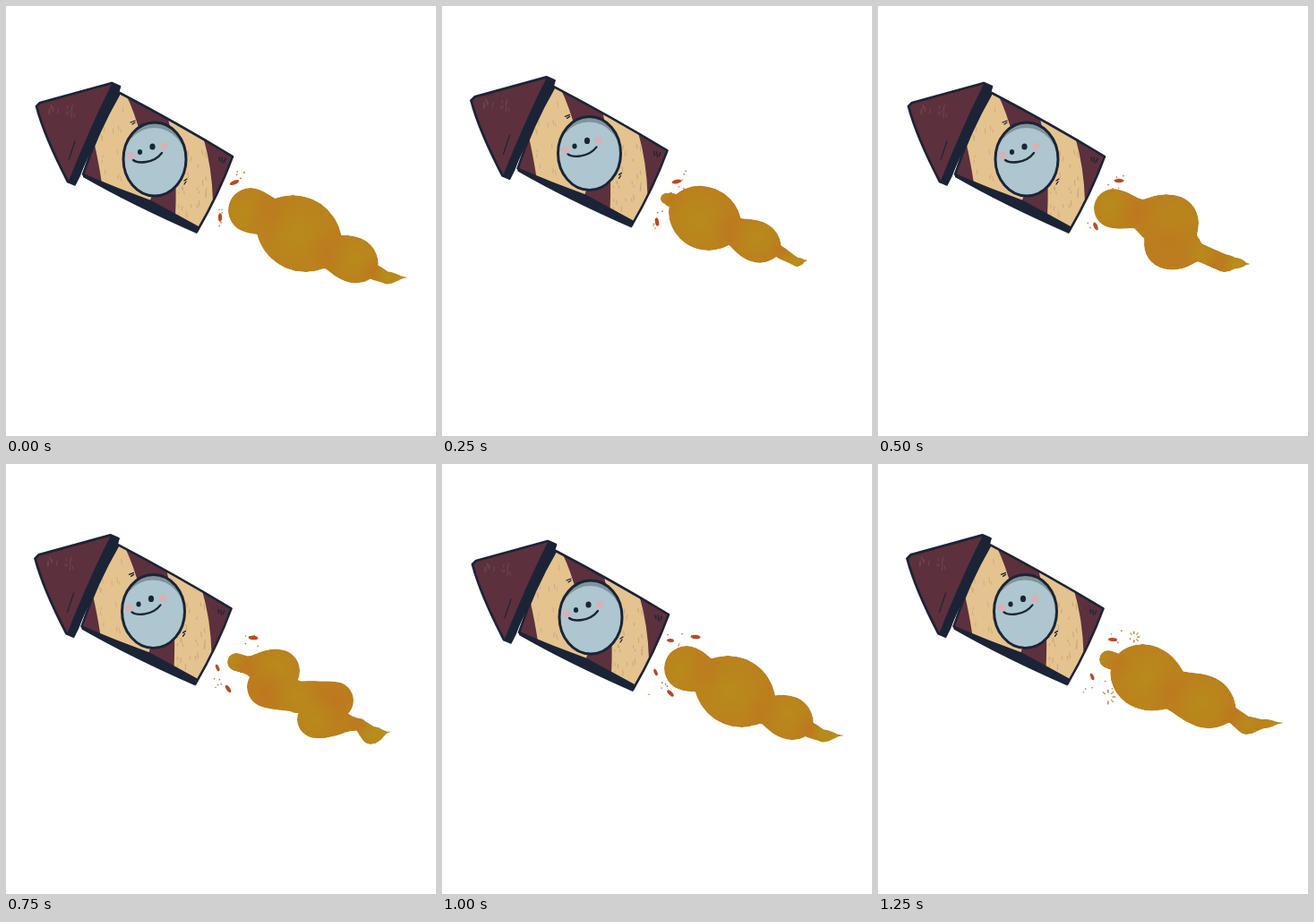
An HTML page with a canvas for the animation above (1500 ms loop, 480 by 480 pixels).

```html
<!DOCTYPE html>
<html lang="en">
<head>
<meta charset="utf-8">
<title>Rocket</title>
<style>
html, body { margin: 0; width: 100%; height: 100%; overflow: hidden; background: #fff; }
canvas { display: block; width: 480px; height: 480px; }
</style>
</head>
<body>
<canvas id="stage" width="480" height="480"></canvas>
<script>
const ctx = document.getElementById('stage').getContext('2d');
const INK = '#1b2437', MAROON = '#5d303d', CREAM = '#e4c38e', GLASS = '#adc6cf';
const FLAME = '#bb7f1e', ORANGE = '#c0711f', MUSTARD = '#b5941a', EMBER = '#b94a22';
const STEP = 250;

function random(seed) {
  return () => (seed = seed * 16807 % 2147483647) / 2147483647;
}

function fill(path, color) { ctx.fillStyle = color; ctx.fill(path); }

function stroke(path, color, width) {
  ctx.strokeStyle = color;
  ctx.lineWidth = width;
  ctx.stroke(path);
}

function oval(x, y, rx, ry, turn = 0) {
  const path = new Path2D();
  path.ellipse(x, y, rx, ry, turn, 0, 7);
  return path;
}

function grain(seed, count, x, y, w, h, color) {
  const rnd = random(seed), path = new Path2D();
  for (let i = 0; i < count; i++) {
    const u = x + rnd() * w, v = y + rnd() * h;
    path.moveTo(u, v);
    path.lineTo(u - 1 + rnd() * 2, v + 2 + rnd() * 4);
  }
  stroke(path, color, 1);
}

const nose = new Path2D('M34 112L38 108L118 86L127 90L77 197L69 196Q43 146 34 112Z');
const band = new Path2D('M119 87L127 90L126 96Q98 148 82 190L77 200L70 197Q96 132 119 87Z');
const body = new Path2D('M127 97Q190 130 253 168Q238 209 213 252L86 188Q102 140 127 97Z');
const keel = new Path2D('M86 187L125 203L162 217L215 246L213 254Q140 222 86 191Z');
const stripes = [
  new Path2D('M98 151Q103 172 107 198L84 188Z'),
  new Path2D('M134 99L181 126Q192 170 189 236L159 222L163 211Q154 140 134 99Z'),
  new Path2D('M220 146L255 166L231 218Q230 180 220 146Z')
];
const ticks = new Path2D('M139 130l5-2M141 132l3-2M199 195l3-2M199 199l2-3M238 169l1 4M241 169l1 6M245 170l-1 4');
const noseLine = new Path2D('M70 172L77 151');
const smile = new Path2D('M142 172C147 176 165 176 174 164');

function drawBody() {
  ctx.save();
  ctx.clip(body);
  fill(body, CREAM);
  grain(41, 16, 106, 112, 26, 80, '#d2ac79');
  grain(77, 28, 192, 160, 32, 72, '#cba579');
  stripes.forEach(s => fill(s, MAROON));
  ctx.restore();
  fill(keel, INK);
  stroke(body, INK, 2.6);
  stroke(ticks, INK, 1.3);
}

function drawFace() {
  const disc = oval(166, 171, 35, 41);
  ctx.save();
  ctx.clip(disc);
  fill(disc, '#7d959d');
  fill(oval(165.5, 178, 37, 42), GLASS);
  ctx.restore();
  stroke(disc, INK, 3);
  fill(oval(139, 167, 4.5, 4), '#d9b0b5');
  fill(oval(176.5, 156.5, 4.5, 4), '#d9b0b5');
  fill(oval(149.5, 163, 2.6, 3), INK);
  fill(oval(163.5, 157, 3.1, 3.6), INK);
  stroke(smile, INK, 2.3);
}

function drawNose() {
  fill(nose, MAROON);
  grain(19, 13, 48, 110, 28, 12, '#704650');
  stroke(nose, INK, 2.8);
  fill(band, INK);
  stroke(band, INK, 1.5);
  stroke(noseLine, INK, 1.2);
}

function drawRocket(lifted) {
  ctx.save();
  if (lifted) ctx.translate(-1.5, -6.6);
  drawBody();
  drawFace();
  drawNose();
  ctx.restore();
}

// A flame is a circle swept along a chain of bulbs and necks: [x, y, radius].
const plume = (neck, bulb, waist, knob) => [
  [273, 228, 25], [293, 235.5, neck], [327, 254, bulb], [363, 274.5, waist],
  [387, 283, knob], [409, 296, 9], [425, 303.5, 7], [447, 303, 0.5]
];
const flames = [
  plume(22, 41, 20, 25.5),
  [[250, 215, 6], [257, 217, 8], [293, 237, 35], [325, 251, 16], [351, 263, 23],
    [376, 274, 7], [396, 286, 5], [407, 284, 0.5]],
  [[263, 226, 22], [290, 232, 17], [327, 242, 31], [325, 266, 28], [361, 276, 10],
    [386, 287, 10], [400, 287, 6], [414, 288, 0.5]],
  [[257, 221, 10], [267, 224, 10], [304, 231, 24], [292, 249, 23], [325, 260, 18],
    [367, 264, 21], [346, 285, 21], [395, 291, 7], [407, 303, 10], [428, 299, 0.5]],
  plume(20, 38, 17, 24),
  [[257, 218, 10], [268, 222, 10], [299, 238, 36], [330, 252, 23], [364, 265, 29],
    [397, 281, 9], [411, 292, 10], [432, 290, 5], [451, 289, 0.5]]
];

function sweep(chain) {
  const path = new Path2D(), parts = 30;
  for (let i = 0; i + 1 < chain.length; i++) {
    const [x, y, r] = chain[i], [x2, y2, r2] = chain[i + 1];
    for (let j = 0; j <= parts; j++) {
      const t = j / parts, ease = t * t * (3 - 2 * t);
      const cx = x + (x2 - x) * t, cy = y + (y2 - y) * t, cr = r + (r2 - r) * ease;
      path.moveTo(cx + cr, cy);
      path.arc(cx, cy, cr, 0, Math.PI * 2);
    }
  }
  return path;
}
const shapes = flames.map(sweep);

function glow(x, y, r, color) {
  const g = ctx.createRadialGradient(x, y, 0, x, y, r);
  g.addColorStop(0, color + '90');
  g.addColorStop(1, color + '00');
  ctx.fillStyle = g;
  ctx.fillRect(x - r, y - r, 2 * r, 2 * r);
}

function drawFlame(i) {
  const rnd = random(500 + i * 97), chain = flames[i];
  ctx.save();
  ctx.clip(shapes[i]);
  fill(shapes[i], FLAME);
  chain.forEach(([x, y, r], k) => {
    const spread = r * 0.4;
    glow(x + (rnd() - 0.5) * spread, y + (rnd() - 0.5) * spread, r + 8, k % 2 ? ORANGE : MUSTARD);
  });
  const [x, y] = chain[chain.length - 1];
  glow(x - 8, y, 28, MUSTARD);
  ctx.restore();
}

function burst(x, y, r) {
  for (let k = 0; k < 6; k++) {
    const a = k * 0.8 - 2.4, c = Math.cos(a), s = Math.sin(a), ray = new Path2D();
    ray.moveTo(x + c * r * 0.6, y + s * r * 0.6);
    ray.lineTo(x + c * r, y + s * r);
    stroke(ray, k % 2 ? EMBER : '#c09020', 1.1);
  }
}

// Embers leave the nozzle above and below, and burst at the end of their flight.
const upper = age => [255 + 7 * age, 197 - age];
const lower = age => [239 + age * Math.abs(age), 236 + 5 * age];

function drawSparks(i) {
  const last = flames.length - 1;
  if (i < last) {
    fill(oval(...upper(i), 5.5, 2.2, Math.min(0.1, 0.2 * i - 0.4)), EMBER);
    fill(oval(...lower(i), 2.1, 4.7, -0.2 * i), EMBER);
  } else {
    burst(286, 193, 6);
    burst(257, 260, 8);
  }
  if (i >= 4) fill(oval(...upper(i - 4), i, 2, 0.1), EMBER);
  if (i >= 3) fill(oval(...lower(i - 4.7), 1.8, 4, -0.4), EMBER);

  const rnd = random(31 + i * 1009);
  for (let k = 0; k < 10; k++) {
    const above = k % 2, u = rnd(), v = rnd();
    const x = above ? 250 + u * (18 + 6 * i) : 238 - 2 * i + u * (4 + 6 * i);
    const y = above ? 184 + v * 20 : 226 + 3 * i + v * 20;
    fill(oval(x, y, 0.9, 0.8), k % 3 ? '#c5662c' : '#c98a2b');
  }
}

function draw(now) {
  const i = Math.floor(now / STEP) % flames.length;
  ctx.fillStyle = '#fff';
  ctx.fillRect(0, 0, 480, 480);
  ctx.lineJoin = ctx.lineCap = 'round';
  drawRocket(i % 2 === 1);
  drawFlame(i);
  drawSparks(i);
}

let start;
function tick(now) {
  if (start === undefined) start = now;
  draw(Math.max(0, now - start));
  requestAnimationFrame(tick);
}
draw(0);
requestAnimationFrame(tick);
</script>
</body>
</html>
```
